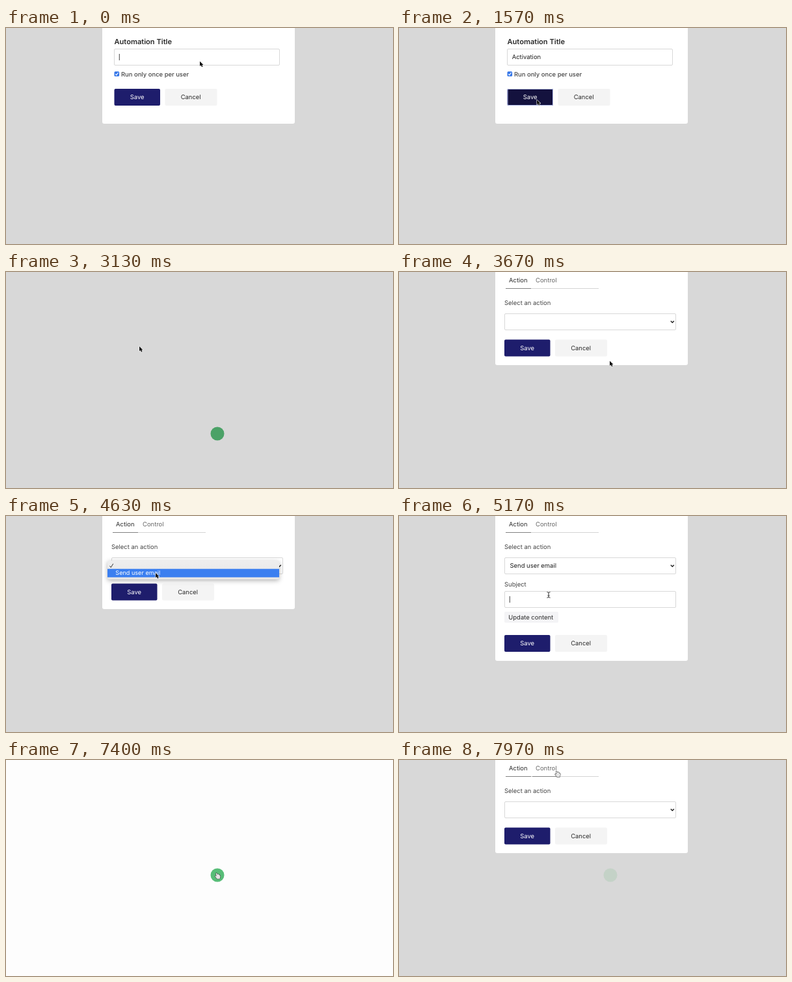
Animation of 595 by 334 pixels, one loop 8000 ms. Source, as an HTML page with a canvas:

```html
<!DOCTYPE html>
<html lang="en">
<head>
<meta charset="utf-8">
<title>Automation setup</title>
<style>
  html, body { margin: 0; width: 100%; height: 100%; overflow: hidden; background: #d8d8d8; }
  canvas { display: block; }
</style>
</head>
<body>
<canvas id="stage" width="595" height="334"></canvas>
<script>
const ctx = document.getElementById('stage').getContext('2d');
ctx.textRendering = 'geometricPrecision';
const LOOP = 8000;
const TRIGGERS = ['', 'Condition...', 'New user profile', 'User joins segment...', 'User joins list...',
  'User leaves segment...', 'User leaves list...', 'User unususcribes from segment...',
  'User unusubcribes from list...'];
const ACTIONS = ['', 'Send user email'];

// Pointer path: time, x, y of the hot spot
const PATH = [
  [0, 298, 51.5], [650, 298, 51.5], [880, 212, 111], [1880, 212, 111], [2180, 268, 71.5], [2630, 268, 71.5],
  [2840, 225, 99], [2930, 225, 99], [3050, 205, 115], [3130, 205, 115], [3350, 325, 247], [3470, 325, 247],
  [3670, 324, 137.5], [3900, 300, 74], [4450, 300, 74], [4600, 230, 88], [4720, 230, 88], [4950, 230, 122],
  [6350, 230, 122], [6650, 189.5, 194], [7080, 189.5, 194], [7350, 324, 175], [7600, 324, 175],
  [7900, 242.5, 17.5], [8000, 242.5, 17.5]
];

const ramp = (t, a, b) => Math.min(1, Math.max(0, (t - a) / (b - a)));
const ease = p => p * p * (3 - 2 * p);
const within = (t, a, b) => t >= a && t < b;
const typed = (text, t, a, b) => text.slice(0, Math.floor(ramp(t, a, b) * text.length));

function pointerAt(t) {
  const i = Math.max(1, PATH.findIndex(k => k[0] > t));
  const [t0, x0, y0] = PATH[i - 1], [t1, x1, y1] = PATH[i];
  const p = ease(ramp(t, t0, t1));
  return [x0 + (x1 - x0) * p, y0 + (y1 - y0) * p];
}

function box(x, y, w, h, fill, stroke, radius = 2) {
  ctx.beginPath();
  ctx.roundRect(x, y, w, h, radius);
  if (fill) { ctx.fillStyle = fill; ctx.fill(); }
  if (stroke) { ctx.strokeStyle = stroke; ctx.lineWidth = 1; ctx.stroke(); }
}

// y is the middle of the capitals
function label(text, x, y, { color = '#2a2a2a', size = 9.45, weight = 400, align = 'left' } = {}) {
  ctx.font = `${weight} ${size}px Inter, sans-serif`;
  ctx.textAlign = align;
  ctx.fillStyle = color;
  ctx.fillText(text, x, y + size * 0.36);
  return ctx.measureText(text).width;
}

function line(points, color, width = 1) {
  ctx.beginPath();
  points.forEach(([x, y]) => ctx.lineTo(x, y));
  ctx.strokeStyle = color;
  ctx.lineWidth = width;
  ctx.stroke();
}

function dot(x, y, color) {
  ctx.beginPath();
  ctx.arc(x, y, 10.5, 0, 7);
  ctx.fillStyle = color;
  ctx.fill();
}

function dialog(height) {
  box(148, -6, 296, height + 6, '#fff', null, 3);
}

function field(x, y, w, text, focused) {
  box(x + .5, y + .5, w, 25, '#fff', '#d8d8d8', 1.5);
  const width = label(text, x + 7.7, y + 13, { color: '#1c1c1c' });
  if (focused) line([[x + 8.3 + width, y + 8], [x + 8.3 + width, y + 18]], '#444');
}

function select(y, text) {
  box(162.5, y + .5, 263, 25, '#fff', '#d8d8d8', 1.5);
  label(text, 170.5, y + 13, { color: '#1c1c1c' });
  line([[417.8, y + 11.8], [420.3, y + 14.3], [422.8, y + 11.8]], '#222', 1.5);
}

function buttons(x, y, pressed) {
  box(x, y, 70.5, 26, '#1e1d6c');
  if (pressed > 0) {
    ctx.globalAlpha = pressed;
    box(x, y, 70.5, 26, '#b3bdec');
    box(x + 1, y + 1, 68.5, 24, '#14123e', null, 1);
    ctx.globalAlpha = 1;
  }
  box(x + 78, y, 80, 26, '#f4f4f4');
  label('Save', x + 35.2, y + 13, { color: '#fff', align: 'center' });
  label('Cancel', x + 117.6, y + 13, { align: 'center' });
}

function menu(items, pointerY) {
  const top = 69, height = 120 - (9 - items.length) * 13;
  const tone = ctx.createLinearGradient(0, top, 0, top + height);
  tone.addColorStop(0, '#eeeeee');
  tone.addColorStop(1, '#e6e6e6');
  ctx.save();
  ctx.shadowColor = 'rgba(0,0,0,.3)';
  ctx.shadowBlur = 7;
  ctx.shadowOffsetY = 2;
  box(156, top, 264, height, tone, null, 3);
  ctx.restore();
  if (items.length > 4) {
    const tint = ctx.createRadialGradient(182, 118, 4, 182, 118, 54);
    tint.addColorStop(0, 'rgba(150,150,230,.42)');
    tint.addColorStop(1, 'rgba(150,150,230,0)');
    box(156, top, 264, height, tint, null, 3);
  }
  line([[159.5, 77.2], [161.3, 79.5], [164.8, 73.8]], '#333');
  items.forEach((item, i) => {
    const y = 75.2 + i * 13;
    const active = i > 0 && Math.abs(pointerY - y) < 6.5;
    if (active) box(156, y - 6.5, 264, 13, '#3b7ff0', null, 0);
    label(item, 168.3, y, { size: 9.1, color: active ? '#fff' : '#2a2a2a' });
  });
}

function titleForm(t) {
  dialog(148);
  label('Automation Title', 166.5, 21, { size: 11.1, weight: 600 });
  field(166, 32, 254, typed('Activation', t, 180, 640), t < 1000);
  box(166.5, 67.2, 7.6, 7.6, '#3375e8', null, 1.5);
  line([[168.2, 71.2], [169.7, 72.8], [172.5, 69]], '#fff', 1.2);
  label('Run only once per user', 177, 71.3, { color: '#444', weight: 500 });
  buttons(166.5, 94, ramp(t, 1000, 1120));
}

function triggerForm(t, pointerY) {
  dialog(145);
  label('Automation trigger', 162, 18, { size: 11.1, weight: 600 });
  label('Select a trigger for your automation workflow.', 162, 48.2, { color: '#444' });
  select(65, t > 2920 ? 'New user profile' : '');
  buttons(162, 105, t > 3050 ? 1 : 0);
  if (within(t, 2250, 2920)) menu(TRIGGERS, pointerY);
}

function actionForm(t, pointerY) {
  const email = within(t, 4700, 7080);
  dialog(email ? 224 : 144);
  label('Action', 169, 12.3);
  label('Control', 210, 12.3, { color: '#666' });
  line([[164, 25.5], [307, 25.5]], '#d4d4d4');
  line([[164, 25.5], [203, 25.5]], '#808080');
  if (t > 7840) line([[205, 25.5], [244, 25.5]], '#808080');
  label('Select an action', 162, 47.8, { color: '#444' });
  select(64, email ? 'Send user email' : '');
  if (email) {
    label('Subject', 162, 106, { color: '#444' });
    field(162, 116, 263, typed('Welcome to Wembrol Co!', t, 5200, 6300), within(t, 5000, 6770));
    box(162, 148, 83, 17, '#f4f4f6');
    label('Update content', 168.3, 156.5);
  }
  buttons(162, email ? 184 : 104.5, email && t > 6770 ? 1 : 0);
  if (within(t, 4350, 4700)) menu(ACTIONS, pointerY);
}

function pointer(t, x, y) {
  ctx.save();
  ctx.translate(x, y);
  ctx.lineJoin = 'round';
  if (within(t, 4900, 6450)) {
    line([[-2.5, -4.5], [0, -3.5], [2.5, -4.5]], '#333');
    line([[0, -3.5], [0, 3.5]], '#333');
    line([[-2.5, 4.5], [0, 3.5], [2.5, 4.5]], '#333');
    line([[-1.5, 1], [1.5, 1]], '#333');
  } else {
    const hand = within(t, 3300, 3520) || within(t, 6580, 7080) || within(t, 7300, 7640) || t > 7840;
    const shape = new Path2D(hand
      ? 'M-1.5 .5Q-.7-.8 .3 .4L1.2 3Q2-.2 5 3.6Q6.4 3.6 6.3 6L5.3 10H.5L-3 5.5Q-2.6 4-.4 5.4Z'
      : 'M0 0V8.6L2 6.8L3.5 10L5.2 9.2L3.8 6.2H6.3Z');
    ctx.scale(.87, .87);
    ctx.strokeStyle = hand ? '#333' : '#fff';
    ctx.fillStyle = hand ? '#e4e4e4' : '#111';
    ctx.lineWidth = 1.2;
    ctx.stroke(shape);
    ctx.fill(shape);
  }
  ctx.restore();
}

function draw(t) {
  const [x, y] = pointerAt(t);
  const first = within(t, 3130, 3500), second = within(t, 7080, 7550);
  const shade = 1 - ramp(t, 3130, 3210) + ramp(t, 3420, 3500) - ramp(t, 7080, 7160) + ramp(t, 7470, 7550);
  ctx.fillStyle = '#fdfdfd';
  ctx.fillRect(0, 0, 595, 334);
  if (first) dot(325, 250, '#58bd78');
  if (second) dot(325, 178, '#58bd78');
  ctx.fillStyle = `rgba(0,0,0,${shade * .146})`;
  ctx.fillRect(0, 0, 595, 334);
  if (t >= 7550) dot(325, 178, 'rgba(100,185,120,.17)');

  if (t < 1850) titleForm(t);
  else if (t < 3130) triggerForm(t, y);
  else if (!first && !second) actionForm(t, y);
  pointer(t, x, y);
}

function tick() {
  draw(performance.now() % LOOP);
  requestAnimationFrame(tick);
}
tick();
</script>
</body>
</html>
```
